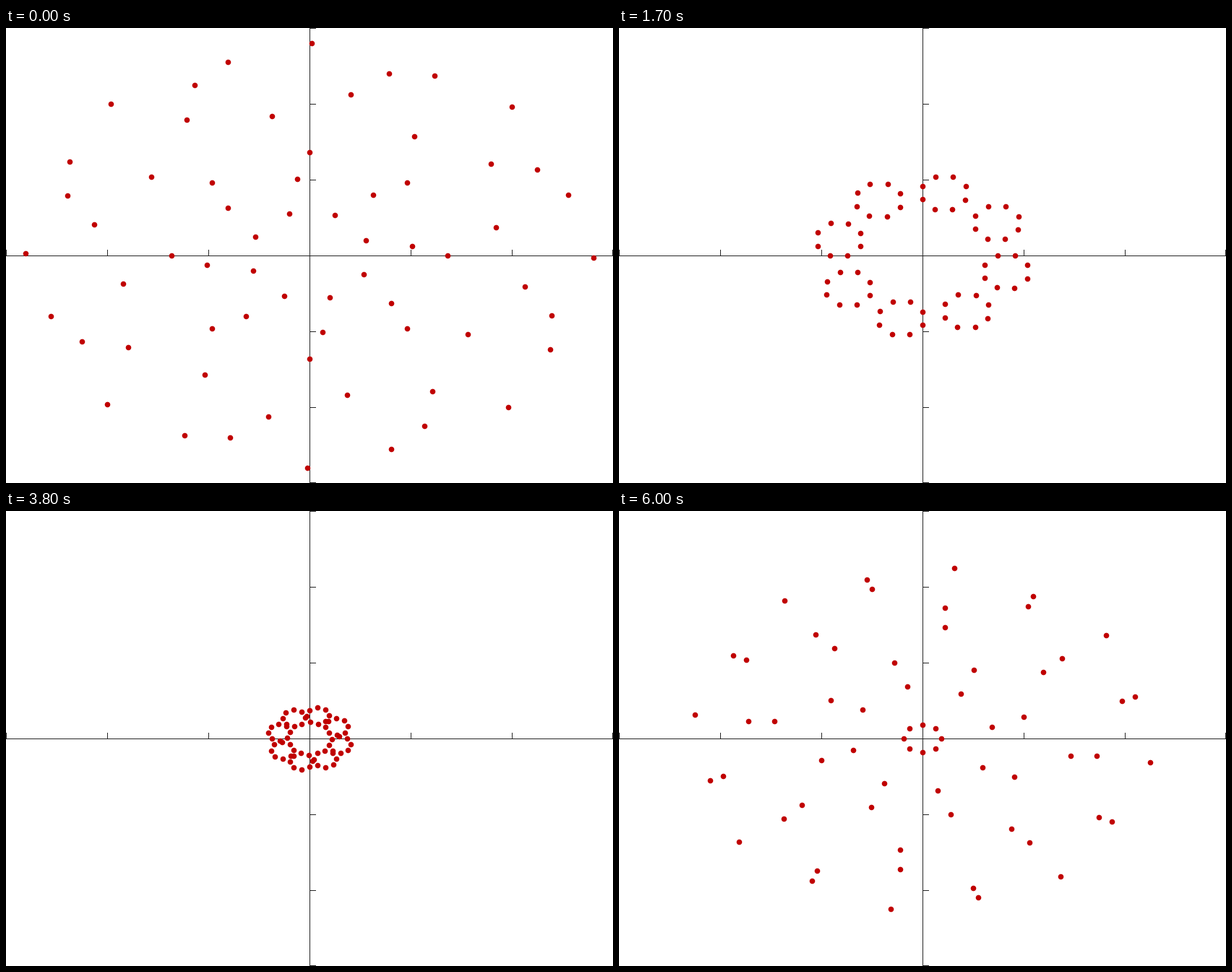
Write a matplotlib script that moves like this. It is 840 by 630 pixels and loops after 6100 ms.

```python
import numpy as np
import matplotlib.pyplot as plt
from matplotlib.animation import FuncAnimation

W, H, DPI = 840, 630, 100
FRAMES, INTERVAL = 61, 100
CX, CY = W / 2, H / 2
UNIT_X, UNIT_Y = 140, 105
PX = 72 / DPI  # one pixel in points
INK, RED = "#262626", "#c00000"
DOT = 7.6
TICK = 8

ROOTS = np.exp(2j * np.pi * np.arange(8) / 8)


def dots(frame):
    """Sums of two turning octagons, as pixel positions."""
    t = frame / 30 - 1
    lift = 1.125j * t * t
    big = 0.5 - 0.75 * t - lift
    small = 0.08 - 0.0225 * t + 0.01 * t * t + lift
    z = np.add.outer(big * ROOTS, small * ROOTS).ravel()
    return np.column_stack([CX + UNIT_X * z.real, CY - UNIT_Y * z.imag])


def stroke(xs, ys):
    # Half-pixel centres fill whole pixels, so snapping must stay off.
    ax.plot(xs, ys, color=INK, lw=PX, solid_capstyle="butt", snap=False, zorder=1)


fig = plt.figure(figsize=(W / DPI, H / DPI), dpi=DPI, facecolor="white")
ax = fig.add_axes([0, 0, 1, 1])
ax.set_xlim(0, W)
ax.set_ylim(H, 0)
ax.axis("off")

stroke([0, W], [CY + 0.5] * 2)
stroke([CX + 0.5] * 2, [0, H])
for i in range(7):
    x = min(i * UNIT_X, W - 1) + 0.5
    y = min(i * UNIT_Y, H - 1) + 0.5
    stroke([x, x], [CY - TICK, CY + 1])
    stroke([CX, CX + TICK + 1], [y, y])

points = ax.scatter(*dots(0).T, s=(DOT * PX) ** 2, c=RED, linewidths=0, zorder=2)


def update(frame):
    points.set_offsets(dots(frame))
    return (points,)


anim = FuncAnimation(fig, update, frames=FRAMES, interval=INTERVAL,
                     repeat=True, repeat_delay=0, blit=False)
plt.show()
```
